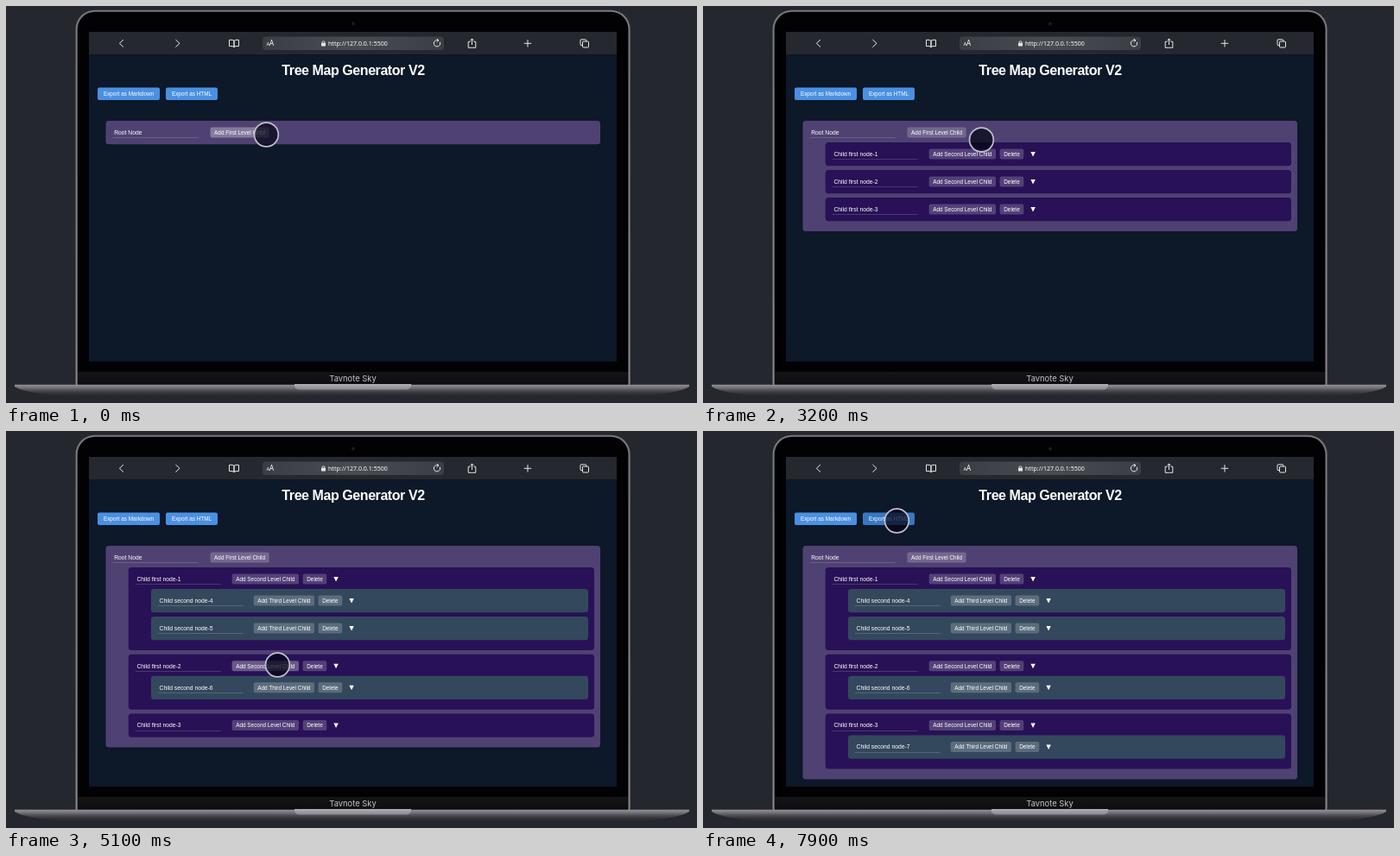
Animation of 800 by 460 pixels, one loop 8 s. Source, as an HTML page with a canvas:

```html
<!DOCTYPE html>
<html lang="en">
<head>
<meta charset="utf-8">
<title>Tree Map Generator</title>
<style>
  html, body { margin: 0; width: 100%; height: 100%; overflow: hidden; background: #25272e; }
  canvas { display: block; width: 800px; height: 460px; }
</style>
</head>
<body>
<canvas id="stage" width="800" height="460"></canvas>
<script>
const ctx = document.getElementById('stage').getContext('2d');
const LOOP = 8000, STEP = 100, TRAVEL = 300;
const SANS = '"Liberation Sans", Arial, sans-serif';
const NOTO = '"Noto Sans", sans-serif';
const INK = '#e6e7ea', BAR = '#25282f';

const HOME = { x: 301, y: 149 };
const MOVES = [
  { at: 0, x: 289, y: 145 },
  { at: 2900, x: 322, y: 155 },
  { at: 3400, x: 318, y: 171 },
  { at: 4200, x: 338, y: 256 },
  { at: 4500, x: 314, y: 271 },
  { at: 5400, x: 312, y: 339 },
  { at: 6700, x: 362, y: 286 },
  { at: 7300, x: 224, y: 104 }
];

const node = (id, at, ...children) => ({ id, at, children });
const TREE = node(0, 0,
  node(1, 400, node(4, 3800), node(5, 4200)),
  node(2, 1300, node(6, 4900)),
  node(3, 2800, node(7, 5800)));

const LEVELS = [
  { fill: '#4f4273', name: () => 'Root Node', add: 'Add First Level Child' },
  { fill: '#281156', name: id => `Child first node-${id}`, add: 'Add Second Level Child' },
  { fill: '#33485c', name: id => `Child second node-${id}`, add: 'Add Third Level Child' }
];
const HEADER = 25, GAP = 4.8, PADDING = 7, LEAF_HEIGHT = 27.2;

const SOFT = ['rgba(255,255,255,.2)', 'rgba(255,255,255,.3)'];
const BLUE = ['#4a90e2', '#3878c2'];

let time = 0, pointer = HOME;

function pointerAt(t) {
  return MOVES.reduce((pos, move) => {
    const p = Math.min(1, Math.max(0, (t - move.at) / TRAVEL));
    const e = p * p * (3 - 2 * p);
    return { x: pos.x + (move.x - pos.x) * e, y: pos.y + (move.y - pos.y) * e };
  }, HOME);
}

function box(x, y, w, h, r, fill, stroke) {
  ctx.beginPath();
  ctx.roundRect(x, y, w, h, r);
  if (fill) { ctx.fillStyle = fill; ctx.fill(); }
  if (stroke) { ctx.strokeStyle = stroke; ctx.lineWidth = 1; ctx.stroke(); }
}

function disc(x, y, r, fill) {
  ctx.beginPath();
  ctx.arc(x, y, r, 0, Math.PI * 2);
  ctx.fillStyle = fill;
  ctx.fill();
}

function text(str, x, y, size, { align = 'left', family = SANS, weight = '', color = '#fff', spacing = 0 } = {}) {
  ctx.font = `${weight} ${size}px ${family}`;
  ctx.letterSpacing = `${spacing}px`;
  ctx.textAlign = align;
  ctx.fillStyle = color;
  ctx.fillText(str, x, y);
  ctx.letterSpacing = '0px';
}

function line(...points) {
  ctx.beginPath();
  points.forEach(([x, y], i) => i ? ctx.lineTo(x, y) : ctx.moveTo(x, y));
  ctx.strokeStyle = INK;
  ctx.lineWidth = 1;
  ctx.stroke();
}

function gradient(x0, y0, x1, y1, ...colors) {
  const g = ctx.createLinearGradient(x0, y0, x1, y1);
  colors.forEach((color, i) => g.addColorStop(i / (colors.length - 1), color));
  return g;
}

// Sizes the button to its label and returns its right edge
function button(label, x, y, h, pad, [fill, hoverFill]) {
  ctx.font = `6.4px ${SANS}`;
  const w = ctx.measureText(label).width + pad * 2;
  const over = pointer.x >= x && pointer.x <= x + w && pointer.y >= y && pointer.y <= y + h;
  box(x, y, w, h, 2, over ? hoverFill : fill);
  text(label, x + pad, y + h / 2 + 2.3, 6.4);
  return x + w;
}

function arrow(x, y) {
  ctx.beginPath();
  ctx.moveTo(x - 2.7, y - 2.5);
  ctx.lineTo(x + 2.7, y - 2.5);
  ctx.lineTo(x, y + 3);
  ctx.fillStyle = '#fff';
  ctx.fill();
}

function drawLaptop() {
  ctx.fillStyle = '#25272e';
  ctx.fillRect(0, 0, 800, 460);

  box(80.6, 4.8, 642, 436, [22, 22, 4, 4], gradient(0, 5, 0, 440, '#79787e', '#8a898f'));
  box(82.7, 6.8, 637.8, 434, [20, 20, 3, 3], '#020204');
  ctx.fillStyle = gradient(0, 424, 0, 439, '#151417', '#0d0d10');
  ctx.fillRect(83, 424, 637, 15);
  text('Tavnote Sky', 401.5, 435, 9.4, { align: 'center', family: 'Inter, sans-serif', color: '#c3c3c6' });
  disc(402, 20.5, 2, '#1b1c22');

  ctx.beginPath();
  ctx.moveTo(10, 438.8);
  ctx.lineTo(791, 438.8);
  ctx.lineTo(791, 441);
  ctx.quadraticCurveTo(778, 449, 735, 452);
  ctx.lineTo(66, 452);
  ctx.quadraticCurveTo(23, 449, 10, 441);
  ctx.fillStyle = gradient(0, 438.8, 0, 452, '#929197', '#75747a', '#4e4d53', '#333339', '#25272e');
  ctx.fill();
  box(334, 438, 135, 6.5, [0, 0, 5, 5], gradient(0, 438, 0, 445, '#b0afb4', '#85848a'));
}

function chevron(x, side) {
  line([x - side * 2.3, 39], [x + side * 2.3, 43.3], [x - side * 2.3, 47.6]);
}

function drawToolbar() {
  ctx.fillStyle = BAR;
  ctx.fillRect(96, 30, 611, 26.5);
  box(297, 35.5, 210, 15.5, 4, gradient(297, 0, 507, 0, '#3b3e45', '#484b52', '#3b3e45'));

  chevron(133.7, -1);
  chevron(198.7, 1);
  for (const side of [-1, 1]) {
    line([264, 40.3], [264 + side * 2, 39.3], [264 + side * 5.5, 39.3],
      [264 + side * 5.5, 46.6], [264 + side * 2, 46.6], [264, 47.6], [264, 40.3]);
    line([539.5 + side * 2, 41.3], [539.5 + side * 4.3, 41.3], [539.5 + side * 4.3, 48.3], [539.5, 48.3]);
    line([539.5 + side * 2.2, 40.2], [539.5, 38], [539.5, 45]);
  }

  text('A', 301.5, 46, 6, { family: NOTO });
  text('A', 305, 46, 8, { family: NOTO });
  text('http://127.0.0.1:5500', 373, 45.8, 7.05, { family: NOTO });
  box(365, 42.7, 5, 3.8, .6, INK);
  box(366, 40.8, 3, 4, 1.5, null, INK);

  ctx.beginPath();
  ctx.arc(499, 43.3, 3.7, -.4, Math.PI * 1.6);
  ctx.stroke();
  line([498.8, 38], [501, 39.9], [498.8, 41.6]);

  line([599.8, 43.3], [608.2, 43.3]);
  line([604, 39.1], [604, 47.5]);
  box(665, 38.8, 6.8, 6.8, 1, null, INK);
  box(667.5, 41, 7, 7, 1, BAR, INK);
}

const visible = parent => parent.children.filter(child => child.at <= time);

function heightOf(item) {
  const children = visible(item);
  if (!children.length) return LEAF_HEIGHT;
  return HEADER + PADDING + children.reduce((sum, child) => sum + heightOf(child) + GAP, 0);
}

function drawNode(item, depth, y) {
  const { fill, name, add } = LEVELS[depth];
  const left = 115.5 + 26.2 * depth, right = 688 - 7 * depth;
  box(left, y, right - left, heightOf(item), 3.5, fill);

  text(name(item.id), left + 9.7, y + 15.7, 6.75);
  ctx.fillStyle = 'rgba(255,255,255,.16)';
  ctx.fillRect(left + 8, Math.floor(y + 19.5), 99, 1);

  let x = button(add, 236.5 + 25.1 * depth, y + 7.4, 12, 4.6, SOFT);
  if (depth) {
    x = button('Delete', x + 4.6, y + 7.4, 12, 4.6, SOFT);
    arrow(x + 10.8, y + 13.5);
  }

  let childY = y + HEADER;
  for (const child of visible(item)) {
    drawNode(child, depth + 1, childY);
    childY += heightOf(child) + GAP;
  }
}

function drawPage() {
  ctx.fillStyle = '#0d1828';
  ctx.fillRect(96, 56.5, 611, 355.5);
  text('Tree Map Generator V2', 402, 80, 16, { align: 'center', weight: 'bold', spacing: -.43 });
  button('Export as Markdown', 106, 94.5, 14.5, 6.9, BLUE);
  button('Export as HTML', 185, 94.5, 14.5, 6.9, BLUE);
  drawNode(TREE, 0, 133);
}

function drawPointer() {
  disc(pointer.x + .4, pointer.y, 13.9, 'rgba(6,5,22,.73)');
  ctx.strokeStyle = '#c2bfce';
  ctx.lineWidth = 1.7;
  ctx.stroke();
}

const start = performance.now();
function frame() {
  time = Math.floor((performance.now() - start) % LOOP / STEP) * STEP;
  pointer = pointerAt(time);
  drawLaptop();
  drawToolbar();
  drawPage();
  drawPointer();
  requestAnimationFrame(frame);
}
frame();
</script>
</body>
</html>
```
